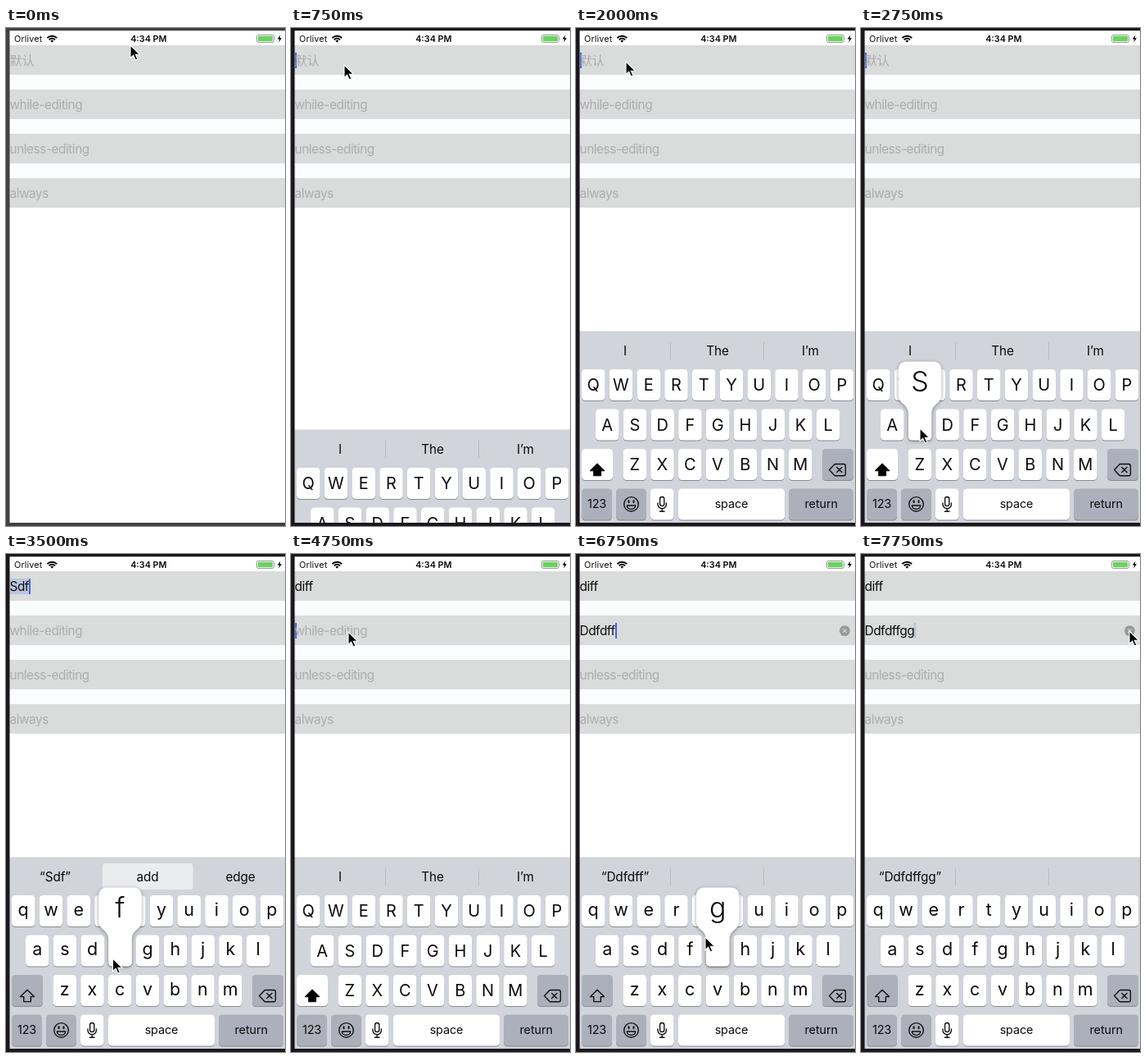
Animation of 341 by 607 pixels, one loop 8 s. Source, as an HTML page:

```html
<!DOCTYPE html>
<html lang="en">
<head>
<meta charset="utf-8">
<title>Text field clear button</title>
<style>
html, body { margin: 0; width: 100%; height: 100%; overflow: hidden; background: #fff; }
#stage { position: relative; width: 341px; height: 607px; overflow: hidden; background: #fff;
  font-family: Inter, "Noto Sans CJK SC", "Noto Sans CJK", sans-serif; }
#gaps { position: absolute; left: 0; top: 21px; width: 341px; height: 198px; background: #fafcfd; }
.field { position: absolute; left: 0; width: 336.5px; height: 36px; padding-left: 4.5px; background: #dadbdb;
  display: flex; align-items: center; font-size: 15.3px; letter-spacing: -.41px; white-space: pre; color: #0c0c0d; }
.field span { line-height: 19px; height: 19px; }
.field .hint { color: #adadaf; }
.field .marked { background: #b9c6dd; }
.field i { width: 2px; height: 19px; margin-right: -2px; background: #4069e6; }
svg { position: absolute; left: 0; top: 0; }
svg text { text-anchor: middle; fill: #0b0b0c; }
.cap { fill: #fff; }
.dark { fill: #abb0ba; }
.line { fill: none; stroke: #111; stroke-width: 1.4; stroke-linejoin: round; stroke-linecap: round; }
.small { font-size: 14.4px; letter-spacing: -.1px; }
.word { font-size: 15.3px; letter-spacing: -.1px; }
#pop { filter: drop-shadow(0 1px 2px rgba(0, 0, 0, .4)); }
#pop text { font-size: 34px; font-weight: 300; }
</style>
</head>
<body>
<div id="stage">
  <div id="gaps"></div>
  <svg width="341" height="607" viewBox="0 0 341 607" id="screen" style="z-index:1">
    <g id="status" font-size="10.8">
      <text x="10" y="16.6" style="text-anchor:start" letter-spacing=".15">Orlivet</text>
      <g fill="none" stroke="#000" stroke-width="1.9">
        <path d="M50.4 12.2a8.3 8.3 0 0 1 11.8 0M52.6 14.3a5.2 5.2 0 0 1 7.4 0"/>
        <path d="M54.4 15.6a2.7 2.7 0 0 1 3.8 0L56.3 17.7Z" fill="#000" stroke="none"/>
      </g>
      <text x="174.3" y="16.6" font-weight="600">4:34 PM</text>
      <rect x="306.4" y="8.4" width="21" height="9.2" rx="2.4" fill="none" stroke="#8d8d8d" stroke-width=".9"/>
      <rect x="307.8" y="9.8" width="18.2" height="6.4" rx="1.2" fill="#6bd360"/>
      <path d="M328.7 11.4q1.3 1.6 0 3.2z" fill="#8d8d8d"/>
      <path d="M335.4 8.6L331.8 13.5H334.2L333.2 17.4L337 12.2H334.6Z"/>
    </g>
    <g id="clear">
      <circle cx="328.4" cy="93.6" r="6.4" fill="#98999c"/>
      <path d="M326.2 91.4l4.4 4.4m0-4.4l-4.4 4.4" stroke="#dadbdb" stroke-width="1.1"/>
    </g>
    <g id="board">
      <rect y="369.5" width="341" height="240" fill="#d1d4da"/>
      <rect id="pick" x="118" y="377" width="110.5" height="32" rx="4" fill="#ebecf0"/>
      <path id="bars" d="M115.5 383v21M229.5 383v21" stroke="#b8bbc2"/>
      <g id="words"></g>
      <g id="keys"></g>
      <path id="shift" class="line" d="M26 531.3L34.4 539.6H30.3V545.6H21.7V539.6H17.6Z"/>
      <path class="line" d="M309.6 538.6l6-6.4q.6-.7 1.6-.7h10q2.2 0 2.2 2.2v9.8q0 2.2-2.2 2.2h-10q-1 0-1.6-.7zM318.8 535.4l6.2 6.2m0-6.2l-6.2 6.2"/>
      <g class="line" stroke-width="1.3">
        <circle cx="67.5" cy="580.4" r="8.8"/>
        <path d="M62.3 582h10.4a5.2 4.4 0 0 1-10.4 0z"/>
        <path d="M64.5 576.3v2M70.5 576.3v2" stroke-width="2"/>
        <rect x="102.6" y="571.5" width="5.2" height="11" rx="2.6"/>
        <path d="M100 579v1.6a5.2 5.2 0 0 0 10.4 0V579M105.2 586v3.2M102.4 589.3h5.6"/>
      </g>
      <g id="pop">
        <path fill="#fff" d="M-3-58H31.5a9 9 0 0 1 9 9V-17C40.5-6 28.5-7 28.5 6V33.5a4.5 4.5 0 0 1-4.5 4.5H4.5a4.5 4.5 0 0 1-4.5-4.5V6C0-7-12-6-12-17V-49a9 9 0 0 1 9-9Z"/>
        <text x="14.2" y="-21.5"></text>
      </g>
    </g>
    <path id="frame" d="M0 0H341V3.2H4.5V603H341V607H0Z"/>
    <path id="mouse" d="M0 0V15.6L3.6 12.2L6.2 18L8.8 16.9L6.3 11.2H11.3Z" stroke="#fff" stroke-width="1.1"/>
  </svg>
</div>
<script>
const STEP = 250, LOOP = 8000, PITCH = 33.75;
const $ = id => document.getElementById(id);
const add = (parent, tag, attrs, text = '') => {
  const el = document.createElementNS('http://www.w3.org/2000/svg', tag);
  for (const k in attrs) el.setAttribute(k, attrs[k]);
  el.textContent = text;
  parent.append(el);
  return el;
};
const show = (el, on) => { el.style.display = on ? '' : 'none'; };

// Text fields
const fields = ['默认', 'while-editing', 'unless-editing', 'always'].map((hint, i) => {
  const box = document.createElement('div');
  box.className = 'field';
  box.style.top = 21 + 54 * i + 'px';
  const text = document.createElement('span'), caret = document.createElement('i');
  box.append(text, caret);
  $('stage').append(box);
  return { hint, text, caret };
});

// Keyboard
function key(x, y, w, cls = 'cap') {
  add($('keys'), 'rect', { x, y: y + 1, width: w, height: 38, rx: 4.5, fill: '#888b91' });
  return add($('keys'), 'rect', { x, y, width: w, height: 38, rx: 4.5, class: cls });
}
const letters = [];
[['QWERTYUIOP', 7, 416], ['ASDFGHJKL', 24, 464.5], ['ZXCVBNM', 57.5, 513]].forEach(([row, x0, y]) =>
  [...row].forEach((ch, i) => {
    const x = x0 + PITCH * i;
    key(x, y, 28.5);
    letters.push({ ch, y, el: add($('keys'), 'text', { x: x + 14.2 }) });
  }));
const shiftKey = key(7, 513, 38);
key(301, 513, 38, 'dark');
key(7, 561.5, 37, 'dark');
key(49, 561.5, 37, 'dark');
key(91, 561.5, 28.5);
key(125, 561.5, 130);
key(260, 561.5, 79, 'dark');
[['123', 25.5], ['space', 190], ['return', 299.7]].forEach(([s, x]) =>
  add($('keys'), 'text', { x, y: 585, class: 'small' }, s));
const words = [60, 173, 286.5].map(x => add($('words'), 'text', { x, y: 398.6, class: 'word' }));

// Timeline: each entry holds until the next
const typing = [
  { t: 0, a: '', b: '', words: 'I,The,I’m', upper: true },
  { t: 750, focus: 0 },
  { t: 2750, pop: 'S' },
  { t: 3000, a: 'S', upper: false, pop: 'd', words: '“S”,So,She' },
  { t: 3250, a: 'Sd', pop: 'f', words: '“Sd”,Do,Did' },
  { t: 3500, a: 'Sdf', words: '“Sdf”,add,edge', marked: true },
  { t: 3750, a: 'Sdff', pop: '', words: '“Sdff”,diff,staff' },
  { t: 4750, a: 'diff', focus: 1, marked: false, upper: true, words: 'I,The,I’m' },
  { t: 5250, pop: 'D' },
  { t: 5500, b: 'D', upper: false, pop: 'd', words: '“D”,Do,Did' },
  { t: 5750, b: 'Dd', pop: 'f' },
  { t: 6000, b: 'Ddf', pop: 'd', words: '“Ddf”,Def,Did' },
  { t: 6250, b: 'Ddfd', pop: 'f', words: '“Ddfd”,,' },
  { t: 6500, b: 'Ddfdf', words: '“Ddfdf”,,' },
  { t: 6750, b: 'Ddfdff', pop: 'g', words: '“Ddfdff”,,' },
  { t: 7000, b: 'Ddfdffg', words: '“Ddfdffg”,,' },
  { t: 7250, b: 'Ddfdffgg', pop: '' },
  { t: 7750, words: '“Ddfdffgg”,,' }
];
const route = [
  [0, 152, 21], [250, 118, 30], [500, 65, 45], [1500, 65, 45], [2000, 61, 41], [2250, 62, 190],
  [2500, 63, 427], [2750, 72, 488], [3000, 103, 490], [3250, 130, 493], [3750, 131, 493],
  [4000, 120, 330], [4250, 92, 160], [4500, 70, 95], [4750, 70, 95], [5000, 92, 310],
  [5250, 106, 487], [5500, 107, 487], [5750, 118, 486], [6000, 108, 486], [6250, 126, 484],
  [6500, 132, 480], [6750, 158, 467], [7000, 162, 470], [7250, 240, 300], [7500, 312, 115], [7750, 328, 94]
];
const dim = { 1500: 0, 2500: 0, 4250: 0, 5000: 0, 7750: .25 };

function pointer(t) {
  const j = route.findIndex(p => p[0] > t);
  if (j < 0) return route[route.length - 1].slice(1);
  const [t0, x0, y0] = route[j - 1], [t1, x1, y1] = route[j];
  const k = (t - t0) / (t1 - t0);
  return [x0 + (x1 - x0) * k, y0 + (y1 - y0) * k];
}

function draw(t) {
  const s = Object.assign({}, ...typing.filter(e => e.t <= t));

  fields.forEach((f, i) => {
    const value = [s.a, s.b][i] || '';
    f.text.textContent = value || f.hint;
    f.text.className = value ? (s.marked && i === 0 ? 'marked' : '') : 'hint';
    f.caret.style.order = value ? 1 : -1;
    show(f.caret, s.focus === i);
    f.caret.style.opacity = dim[t] ?? 1;
  });
  show($('clear'), s.b);

  show($('board'), t >= 750);
  const drop = t < 1000 ? 120 : t < 1250 ? 6.2 : 0;
  $('board').setAttribute('transform', `translate(0 ${drop})`);
  letters.forEach(({ ch, y, el }) => {
    el.textContent = s.upper ? ch : ch.toLowerCase();
    el.setAttribute('y', y + (s.upper ? 26.2 : 24.6));
    el.setAttribute('font-size', s.upper ? 20 : 21.5);
  });
  shiftKey.setAttribute('class', s.upper ? 'cap' : 'dark');
  $('shift').style.fill = s.upper ? '#000' : 'none';
  s.words.split(',').forEach((w, i) => { words[i].textContent = w; });
  show($('pick'), s.marked);
  show($('bars'), !s.marked);

  show($('pop'), s.pop);
  if (s.pop) {
    const col = 'ASDFG'.indexOf(s.pop.toUpperCase());
    $('pop').setAttribute('transform', `translate(${24 + PITCH * col} 464.5)`);
    $('pop').lastElementChild.textContent = s.pop;
  }

  $('frame').setAttribute('fill', t < 500 ? '#414143' : '#1b181d');
  $('mouse').setAttribute('transform', `translate(${pointer(t).join(' ')})`);
}

let last = -1;
const start = performance.now();
function tick() {
  const t = Math.floor(((performance.now() - start) % LOOP) / STEP) * STEP;
  if (t !== last) draw(last = t);
  requestAnimationFrame(tick);
}
tick();
</script>
</body>
</html>
```
